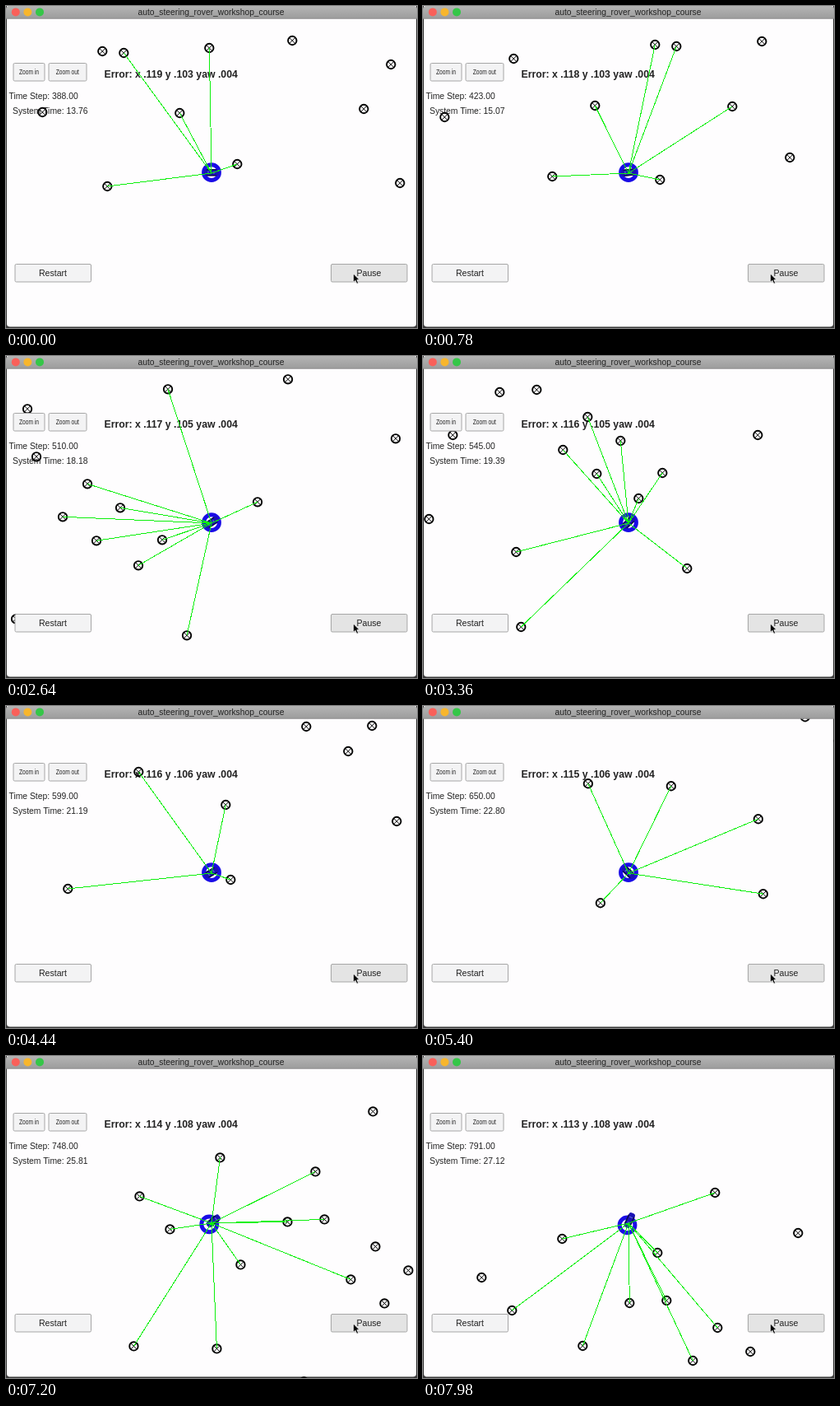
These frames come from a looping animation (500 by 391 pixels, 8 s). An HTML page:

```html
<!DOCTYPE html>
<html lang="en">
<head>
<meta charset="utf-8">
<title>Localization view</title>
<style>
  html, body { margin: 0; width: 100%; height: 100%; overflow: hidden; background: #3a3a3a; }
  svg { display: block; width: 100vw; height: 100vh; font-family: "Liberation Sans", Arial, sans-serif; fill: #222; }
  .mid { text-anchor: middle; }
  .btn { stroke: #a6a6a6; }
</style>
</head>
<body>
<svg viewBox="0 0 500 391">
  <defs>
    <linearGradient id="bar" x2="0" y2="1">
      <stop offset="0" stop-color="#b4b4b4"/><stop offset="1" stop-color="#9c9c9c"/>
    </linearGradient>
    <g id="mark" fill="none" stroke="#000">
      <circle r="5.2" stroke-width="1.9"/>
      <path d="M-3.4-3.4 3.4 3.4M3.4-3.4-3.4 3.4"/>
    </g>
  </defs>
  <path d="M1 0H499V386Q499 389.5 495 389.5H5Q1 389.5 1 386Z" fill="#fefdfe"/>
  <text id="error" x="119.5" y="86.5" font-size="12.28" font-weight="bold"></text>
  <text id="step" x="3.5" y="112.5" font-size="10.35"></text>
  <text id="clock" x="8" y="131.3" font-size="10.35"></text>

  <g id="marks"></g>
  <circle id="ring" r="9.4" fill="none" stroke="#1a0ce6" stroke-width="5"/>
  <g id="body">
    <rect x="-9.5" y="-4" width="19" height="8" rx="3" fill="#1a12b4"/>
    <path d="M-6-3.5H6M-6 3.5H6" stroke="#0b0b50" stroke-width="1.5"/>
    <path d="M-3-1.5V1.5M4-2V2" stroke="#5f66d8" stroke-width="1.2"/>
  </g>
  <path id="rays" fill="none" stroke="#0cf00c" shape-rendering="crispEdges"/>

  <g class="btn" fill="#f3f3f4">
    <rect x="9" y="69.5" width="38" height="21.5" rx="1.5"/>
    <rect x="52" y="69.5" width="46" height="21.5" rx="1.5"/>
    <rect x="11" y="313.5" width="92.5" height="21.5" rx="1.5"/>
    <rect x="395.5" y="313.5" width="92.5" height="21.5" rx="1.5" fill="#e4e4e4"/>
  </g>
  <g class="mid" font-size="9">
    <text transform="translate(28 83.3) scale(.74 1)">Zoom in</text>
    <text transform="translate(74.8 83.3) scale(.74 1)">Zoom out</text>
  </g>
  <g class="mid" font-size="10.6">
    <text x="57" y="328">Restart</text>
    <text x="441.5" y="328">Pause</text>
  </g>
  <path d="M422.5 325V335.5L425 333.3 426.8 337.2 428.6 336.4 426.9 332.6H430Z" fill="#000" stroke="#fff" stroke-width=".7"/>

  <path d="M0 15.5V4Q0 0 4 0H496Q500 0 500 4V15.5Z" fill="url(#bar)"/>
  <path d="M0 15.2H500" stroke="#858585" stroke-width=".7"/>
  <circle cx="11.8" cy="7.4" r="5" fill="#f9605a"/>
  <circle cx="26.4" cy="7.4" r="5" fill="#f8b62c"/>
  <circle cx="41" cy="7.4" r="5" fill="#35c648"/>
  <text class="mid" x="249.5" y="11" font-size="10.3">auto_steering_rover_workshop_course</text>
</svg>
<script>
const TICK = 60, LOOP = 8000, END = 7980;
const RANGE = 187.5, SPEED = .185;
const CAR = { x: 250, y: 203 };
const $ = id => document.getElementById(id);

// The fixed map: "x,y" of each landmark. The view scrolls over it.
const landmarks = `117,55 143,57 247,51 348,42 468,71 435,125 479,215 281,192 211,130
  123,219 44,129 -55,72 -8,215 -139,143 -210,84 -285,155 -176,292 -343,299 -292,338
  -321,369 -490,240 -445,237 -547,292 -383,270 -413,310 -372,339 -576,394 -470,434
  -262,454 -464,525 -662,536 -572,162 -456,179 -670,209 -633,249 -677,391 -386,106`
  .split(/\s+/).map(p => p.split(",").map(Number));

// Bends of the drive: time, scroll x, scroll y, heading in degrees below left
const route = [
  [0, 0, 0, 0],
  [780, 165, -8, 6],
  [1920, 367, -55, 21],
  [3360, 583, -196, 43],
  [4440, 737, -314, 31],
  [6360, 919, -148, -105],
  [END, 741, 60, -115]
].map(([t, x, y, deg]) => {
  const a = deg * Math.PI / 180;
  return { t, x, y, vx: SPEED * Math.cos(a), vy: -SPEED * Math.sin(a) };
});

function hermite(p, q, m, n, u) {
  const u2 = u * u, u3 = u2 * u;
  return (2 * u3 - 3 * u2 + 1) * p + (u3 - 2 * u2 + u) * m + (3 * u2 - 2 * u3) * q + (u3 - u2) * n;
}

function scrollAt(t) {
  const i = Math.max(1, route.findIndex(k => k.t >= Math.min(t, END)));
  const a = route[i - 1], b = route[i], span = b.t - a.t, u = (t - a.t) / span;
  return {
    x: hermite(a.x, b.x, a.vx * span, b.vx * span, u),
    y: hermite(a.y, b.y, a.vy * span, b.vy * span, u)
  };
}

const marks = landmarks.map(() => {
  const use = document.createElementNS("http://www.w3.org/2000/svg", "use");
  use.setAttribute("href", "#mark");
  return $("marks").appendChild(use);
});

const place = (el, x, y, deg = 0) =>
  el.setAttribute("transform", `translate(${x.toFixed(2)} ${y.toFixed(2)}) rotate(${deg.toFixed(1)})`);

function drawMap(view) {
  let rays = "";
  landmarks.forEach(([mx, my], i) => {
    const x = mx + view.x + .3, y = my + view.y;
    place(marks[i], x, y);
    if (Math.hypot(x - CAR.x, y - CAR.y) < RANGE) rays += `M${CAR.x} ${CAR.y}L${x.toFixed(1)} ${y.toFixed(1)}`;
  });
  $("rays").setAttribute("d", rays);
}

// The estimate ring now and then trails behind the car.
function drawCar(tick) {
  const before = scrollAt(tick * TICK - 20), after = scrollAt(tick * TICK + 20);
  const dir = Math.atan2(before.y - after.y, before.x - after.x);
  const lag = [3, 6].includes(tick % 13) ? 1 : 0;
  const along = d => [CAR.x + d * Math.cos(dir), CAR.y - .8 + d * Math.sin(dir)];
  place($("ring"), ...along(-3.5 * lag));
  place($("body"), ...along(3 * lag), dir * 180 / Math.PI);
}

function drawText(p) {
  const slack = 13 * Math.sin(Math.PI * p);
  const err = v => "." + Math.round(v);
  $("error").textContent = `Error: x ${err(119 - 6 * p)} y ${err(103 + 5 * p)} yaw .004`;
  $("step").textContent = `Time Step: ${Math.round(388 + 403 * p - slack)}.00`;
  $("clock").textContent = `System Time: ${(13.76 + 13.36 * p).toFixed(2)}`;
}

function draw(t) {
  const tick = Math.floor(t / TICK), ms = tick * TICK;
  drawMap(scrollAt(ms));
  drawCar(tick);
  drawText(ms / END);
}

const start = performance.now();
function frame() {
  draw((performance.now() - start) % LOOP);
  requestAnimationFrame(frame);
}
frame();
</script>
</body>
</html>
```
